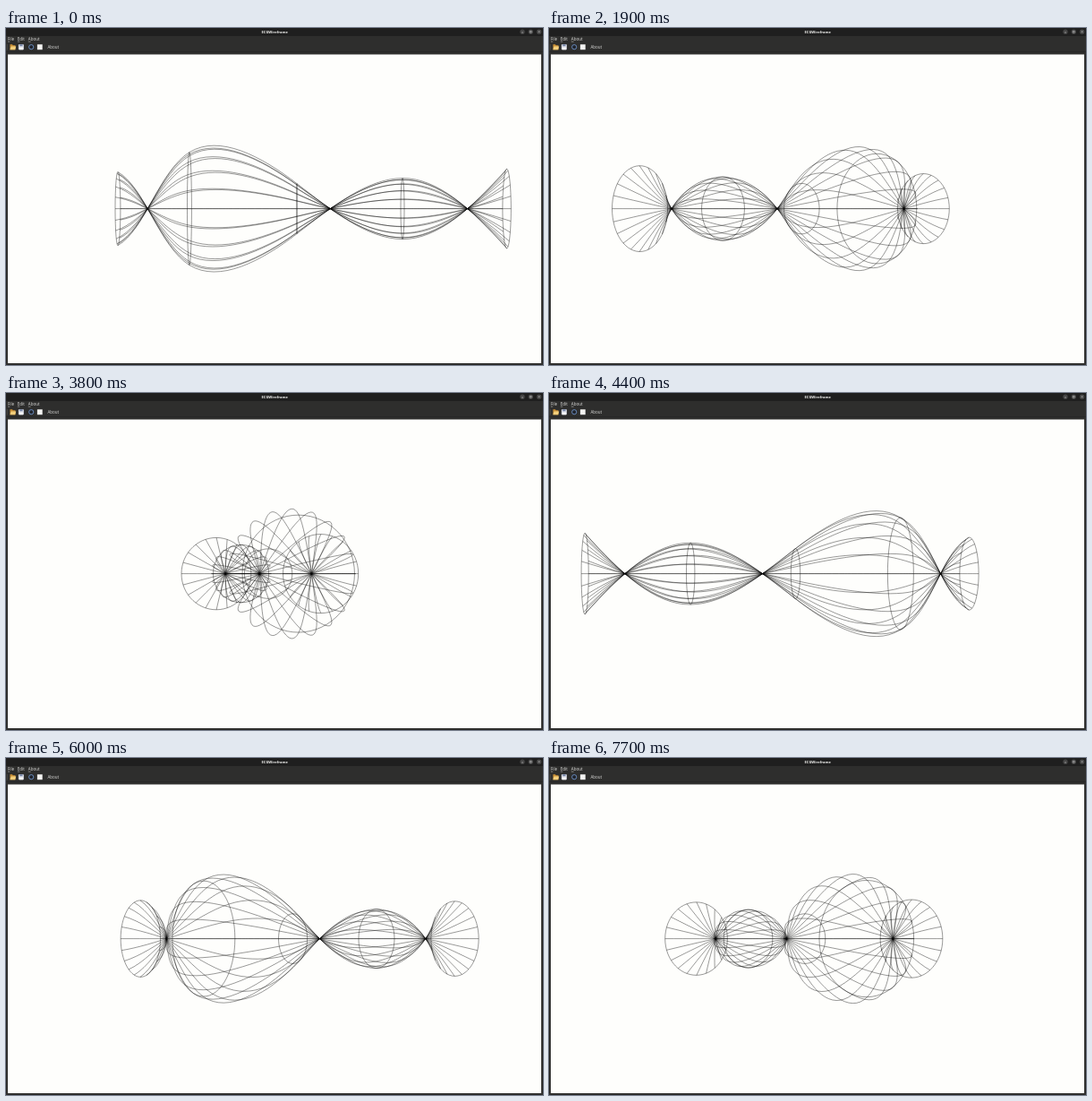
An HTML page for the animation above (8.1 s loop, 600x376 px).

```html
<!DOCTYPE html>
<html lang="en">
<head>
<meta charset="utf-8">
<title>ECGWireframe</title>
<style>
  html, body { margin: 0; width: 100%; height: 100%; overflow: hidden; background: #2e2e2d; }
  svg { display: block; width: 100vw; height: 100vh; }
  text { font: 4.5px "Open Sans", "Noto Sans", sans-serif; fill: #dededc; }
  .title { font-size: 4.1px; font-weight: 700; fill: #f4f4f2; text-anchor: middle; }
  tspan { text-decoration: underline; }
</style>
</head>
<body>
<svg viewBox="0 0 600 376">
  <rect width="600" height="376" fill="#2e2e2d"/>
  <rect width="600" height="9" fill="#1f1f1f"/>
  <text class="title" x="300.3" y="5.7">ECGWireframe</text>
  <g fill="#454545">
    <circle cx="577" cy="4.2" r="2.7"/>
    <circle cx="586.3" cy="4.2" r="2.7"/>
    <circle cx="595.6" cy="4.2" r="2.7"/>
  </g>
  <path d="M576 5h2M585.4 3.4h1.8v1.8h-1.8zM594.7 3.3l1.8 1.8m0-1.8l-1.8 1.8" fill="none" stroke="#ddd" stroke-width=".5"/>
  <text x="2" y="13.9"><tspan>F</tspan>ile</text>
  <text x="12.8" y="13.9"><tspan>E</tspan>dit</text>
  <text x="24.8" y="13.9"><tspan>A</tspan>bout</text>
  <path d="M0 26.5h600" stroke="#282828"/>
  <path d="M1.3 18v6.5" stroke="#555" stroke-width=".6"/>
  <path d="M4.5 18.2h2.5l.8 1h2.7v5h-6z" fill="#c98f35"/>
  <path d="M5.6 20.5h5.6l-1 3.7h-5.7z" fill="#f3cf7c"/>
  <rect x="13.9" y="18.2" width="6" height="6" rx=".6" fill="#d5d9e2"/>
  <path d="M15.3 18.2h3.2v2h-3.2z" fill="#7483a5"/>
  <path d="M15 21.6h4v2.6h-4z" fill="#fff"/>
  <circle cx="28.2" cy="21.2" r="2.6" fill="#20242c" stroke="#6f94c9" stroke-width=".9"/>
  <rect x="34.9" y="18.3" width="5.8" height="5.9" fill="#f4f4f2"/>
  <text x="46.4" y="22.6">About</text>
  <rect x="2" y="29.5" width="596" height="344.5" fill="#fefefc"/>
  <path id="wire" fill="none" stroke="#000" stroke-width=".4"/>
</svg>
<script>
const LOOP = 8100, STEP = 100, MERIDIANS = 20, DEPTH = 0.00041;

// Profile joints: axis position, signed radius, and their slopes.
const joints = [
  [-175, -41, 90, 51],
  [-95, 63, 100, 61],
  [25, 28, 120, -92],
  [143, -34, 118, -1],
  [259.5, 44.3, 118, 132]
];

// Turn about the vertical axis: time in ms, degrees.
const turns = [
  [700, 0], [1200, -56.3], [2600, -214], [3400, -304], [3800, -254],
  [5100, -69.4], [6000, 34.7], [6100, 46], [6900, 113], [7000, 113], [7100, 124.5]
];

function hermite(a, b, slopeA, slopeB, u) {
  const v = 1 - u;
  return a * (1 + 2 * u) * v * v + slopeA * u * v * v
       + b * u * u * (3 - 2 * u) - slopeB * u * u * v;
}

const profile = [];
for (let i = 0; i < joints.length - 1; i++) {
  const [s0, r0, ds0, dr0] = joints[i], [s1, r1, ds1, dr1] = joints[i + 1];
  for (let u = 0; u < 1; u += 1 / 16)
    profile.push([hermite(s0, s1, ds0, ds1, u), hermite(r0, r1, dr0, dr1, u)]);
}
profile.push(joints.at(-1));

function angleAt(t) {
  if (t <= turns[0][0]) return 0;
  const next = turns.findIndex(([time]) => time >= t);
  if (next < 0) return turns.at(-1)[1];
  const [t0, a0] = turns[next - 1], [t1, a1] = turns[next];
  return a0 + (a1 - a0) * (t - t0) / (t1 - t0);
}

function wireframe(degrees) {
  const angle = degrees * Math.PI / 180;
  const cos = Math.cos(angle), sin = Math.sin(angle);

  const project = (s, r, phi) => {
    const across = r * Math.cos(phi);
    const scale = 1 / (1 + DEPTH * (s * sin + across * cos));
    const x = 300 + (s * cos - across * sin) * scale;
    const y = 201.6 + r * Math.sin(phi) * scale;
    return x.toFixed(2) + " " + y.toFixed(2);
  };
  const line = points => "M" + points.join("L");

  let d = "";
  for (let m = 0; m < MERIDIANS; m++)
    d += line(profile.map(([s, r]) => project(s, r, m * 2 * Math.PI / MERIDIANS)));
  for (const [s, r] of joints)
    d += line(Array.from({ length: 60 }, (_, i) => project(s, r, i * Math.PI / 30))) + "Z";
  return d;
}

const wire = document.getElementById("wire");
let shown;

function draw() {
  const t = Math.floor(performance.now() % LOOP / STEP) * STEP;
  const degrees = angleAt(t);
  if (degrees !== shown) wire.setAttribute("d", wireframe(shown = degrees));
  requestAnimationFrame(draw);
}
draw();
</script>
</body>
</html>
```
